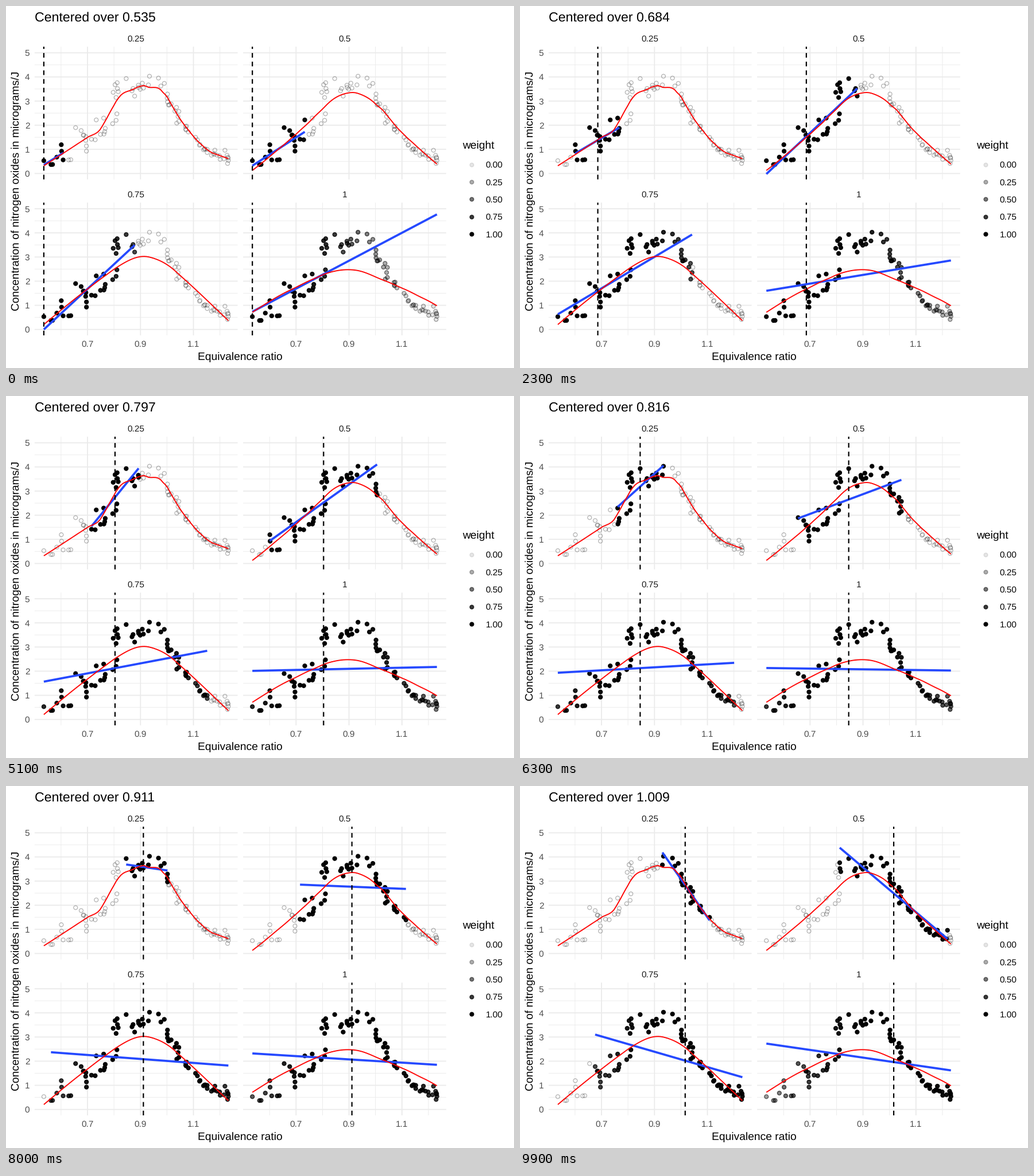
These frames come from a looping animation (885x632 px, 10 s). A matplotlib script:

```python
import numpy as np
import matplotlib.pyplot as plt
from matplotlib.animation import FuncAnimation

W, H, DPI = 885, 632, 100
PT = 72 / DPI            # one pixel in matplotlib points
U = 1.754                # one theme point in pixels
SMALL, MEDIUM, LARGE = 8.8 * U, 11 * U, 13.2 * U

plt.rcParams["font.family"] = "Liberation Sans"
plt.rcParams["text.hinting"] = "none"

# Ethanol data: runs of NOx values, E growing by 0.001 within a run
_ = None
RUNS = {
    0.535: [0.53], 0.562: [0.37], 0.568: [0.374], 0.584: [0.678],
    0.601: [1.192, 0.923], 0.608: [0.563], 0.629: [0.561], 0.637: [0.571],
    0.655: [1.9], 0.676: [1.777], 0.684: [1.587, _, 1.59],
    0.693: [1.369, 1.527, _, (0.926, 1.139)], 0.715: [1.419],
    0.729: [1.397, _, _, _, 2.219], 0.749: [1.62],
    0.761: [2.295, 1.634, _, _, 1.732, _, 1.869], 0.795: [2.064, _, 3.361],
    0.804: [3.677, _, _, _, (3.148, 2.202), _, _, 2.471, 3.76, 3.517, _, _, 3.388],
    0.846: [3.931], 0.868: [3.423, _, _, _, 3.519], 0.878: [3.206],
    0.892: [3.656, 3.567], 0.899: [3.488], 0.907: [3.741, _, _, _, 3.536],
    0.930: [3.669, _, _, _, 4.028], 0.968: [3.952], 0.977: [3.623],
    0.990: [3.732], 1.001: [3.12, (3.29, 2.964), _, _, _, 2.836],
    1.009: [2.845], 1.016: [2.881], 1.030: [2.581], 1.036: [2.739, 2.085],
    1.042: [2.358, _, _, (2.571, 2.157)],
    1.070: [1.947, 1.836, 1.806, _, 1.962], 1.081: [1.719], 1.108: [1.498],
    1.115: [1.39], 1.123: [1.17, _, 1.2], 1.138: [0.981],
    1.142: [1.013, _, 1.021], 1.152: [(1.0, 0.866)], 1.168: [0.756],
    1.175: [0.812], 1.180: [0.797, 0.966], 1.189: [0.76],
    1.199: [0.727, _, 0.586], 1.215: [0.606], 1.219: [0.962],
    1.227: [0.754, _, 0.414, 0.672, 0.638, 0.542],
}
X, Y = np.array([(round(x0 + k / 1000, 3), y)
                 for x0, run in RUNS.items()
                 for k, ys in enumerate(run) if ys is not None
                 for y in np.atleast_1d(ys)]).T
CENTERS = np.unique(X)
REACH = X[-1] - X[0]
# span -> half width of the window
WINDOWS = {0.25: 0.0930, 0.5: 0.2045, 0.75: 0.356, 1: 0.7}


def tricube(u):
    return np.clip(1 - np.abs(u) ** 3, 0, 1) ** 3


def line_fit(x, y, w):
    slope, level = np.polyfit(x, y, 1, w=np.sqrt(w))
    return level, slope


def local_fit(x0, q):
    d = np.abs(X - x0)
    return line_fit(X - x0, Y, tricube(d / np.sort(d)[q - 1]))


def cuts(lo, hi, cell):
    if hi - lo <= cell:
        return []
    m = (lo + hi + 1) // 2
    return cuts(lo, m, cell) + [(X[m - 1] + X[m]) / 2] + cuts(m, hi, cell)


def loess(span, xs):
    """Degree 1 loess, blended between the vertices of a k-d tree."""
    n = len(X)
    pad = 0.1 * REACH
    inner = cuts(0, n, int(n * span * 0.2))
    v = np.unique([X[0] - pad, *inner, X[-1] + pad])
    f, g = np.array([local_fit(x0, int(n * span)) for x0 in v]).T
    i = np.searchsorted(v, xs, side="right") - 1
    h = v[i + 1] - v[i]
    t = (xs - v[i]) / h
    s = 1 - t
    return (f[i] * s * s * (1 + 2 * t) + f[i + 1] * t * t * (1 + 2 * s)
            + h * (g[i] * t * s * s - g[i + 1] * t * t * s))


fig = plt.figure(figsize=(W / DPI, H / DPI), dpi=DPI, facecolor="white")
ax = fig.add_axes([0, 0, 1, 1])
ax.set(xlim=(0, W), ylim=(H, 0))
ax.axis("off")


def label(x, y, s, size=SMALL, color="black", **kw):
    return ax.text(x, y, s, fontsize=size * PT, color=color,
                   **{"va": "baseline", **kw})


def stroke(xs, ys, width, color, z, **kw):
    return ax.plot(xs, ys, color=color, lw=width * PT, zorder=z, snap=False,
                   solid_capstyle="butt", dash_capstyle="butt", **kw)[0]


def dots(x, y, z, face, edge):
    return ax.scatter(x, y, s=(6.86 * PT) ** 2, linewidths=1.24 * PT,
                      facecolors=face, edgecolors=edge, zorder=z)


def shade(alpha):
    rgba = np.zeros((len(alpha), 4))
    rgba[:, 3] = alpha
    return rgba


class Panel:
    def __init__(self, span, col, row):
        self.reach = WINDOWS[span]
        self.dx, self.dy = 363.3 * col, 272.3 * row
        left, right = 49.8 + self.dx, 403.5 + self.dx
        top, bottom = 71 + self.dy, 302.7 + self.dy

        for k in range(11):
            y = self.py(k / 2)
            stroke([left, right], [y, y], 0.93 * (2 - k % 2), "#ebebeb", 1 - k % 2)
        for k in range(6, 13):
            x = self.px(k / 10)
            stroke([x, x], [top, bottom], 0.93 * (1 + k % 2), "#ebebeb", k % 2)

        label((left + right) / 2, 61.7 + self.dy, f"{span:g}", color="#1a1a1a", ha="center")
        if col == 0:
            for k in range(6):
                label(41.3, self.py(k) + 5.6, str(k), color="#4d4d4d", ha="right")
        if row == 1:
            for k in (0.7, 0.9, 1.1):
                label(self.px(k), 595.3, f"{k:g}", color="#4d4d4d", ha="center")

        px, py = self.px(X), self.py(Y)
        dots(px, py, 2, "none", (0, 0, 0, 0.3))
        self.near = dots(px, py, 3, shade(X * 0), shade(X * 0))
        self.fit = stroke([], [], 3.74, "#2549ff", 4)
        xs = np.linspace(X[0], X[-1], 80)
        stroke(self.px(xs), self.py(loess(span, xs)), 1.87, "#ff0000", 5)
        self.mark = stroke([left, left], [bottom, top], 2.2, "black", 6,
                           dashes=(3.7, 3.2))

    def px(self, x):
        return 142 + 461.3 * (x - 0.7) + self.dx

    def py(self, y):
        return 292.4 - 42.15 * y + self.dy

    def center(self, c):
        d = np.abs(X - c)
        inside = d <= self.reach
        w = tricube(d / REACH)
        colors = shade(np.where(inside, 0.1 + 0.9 * w, 0))
        self.near.set_facecolors(colors)
        self.near.set_edgecolors(colors)

        level, slope = line_fit(X[inside] - c, Y[inside], w[inside])
        ends = X[inside][[0, -1]]
        self.fit.set_data(self.px(ends), self.py(level + slope * (ends - c)))
        self.mark.set_xdata([self.px(c)] * 2)


panels = [Panel(span, i % 2, i // 2) for i, span in enumerate(WINDOWS)]

title = label(49.8, 26.6, "", LARGE)
label(408.3, 618, "Equivalence ratio", MEDIUM, ha="center")
label(22.6, 323, "Concentration of nitrogen oxides in micrograms/J", MEDIUM,
      rotation=90, ha="right", va="center").set(
          rotation_mode="anchor", ha="center", va="baseline")

label(795.5, 249.3, "weight", MEDIUM)
for k in range(5):
    y = 276.6 + 30.35 * k
    a = shade([0.1 + 0.225 * k])
    dots([810.7], [y], 3, a, a)
    label(835.5, y + 5.6, f"{k / 4:.2f}")


def draw(i):
    # the title switches one step after the panels do
    title.set_text(f"Centered over {CENTERS[i // 2]:g}")
    for p in panels:
        p.center(CENTERS[(i + 1) // 2])


anim = FuncAnimation(fig, draw, frames=100, interval=100, repeat=True,
                     init_func=lambda: draw(0))
plt.show()
```
